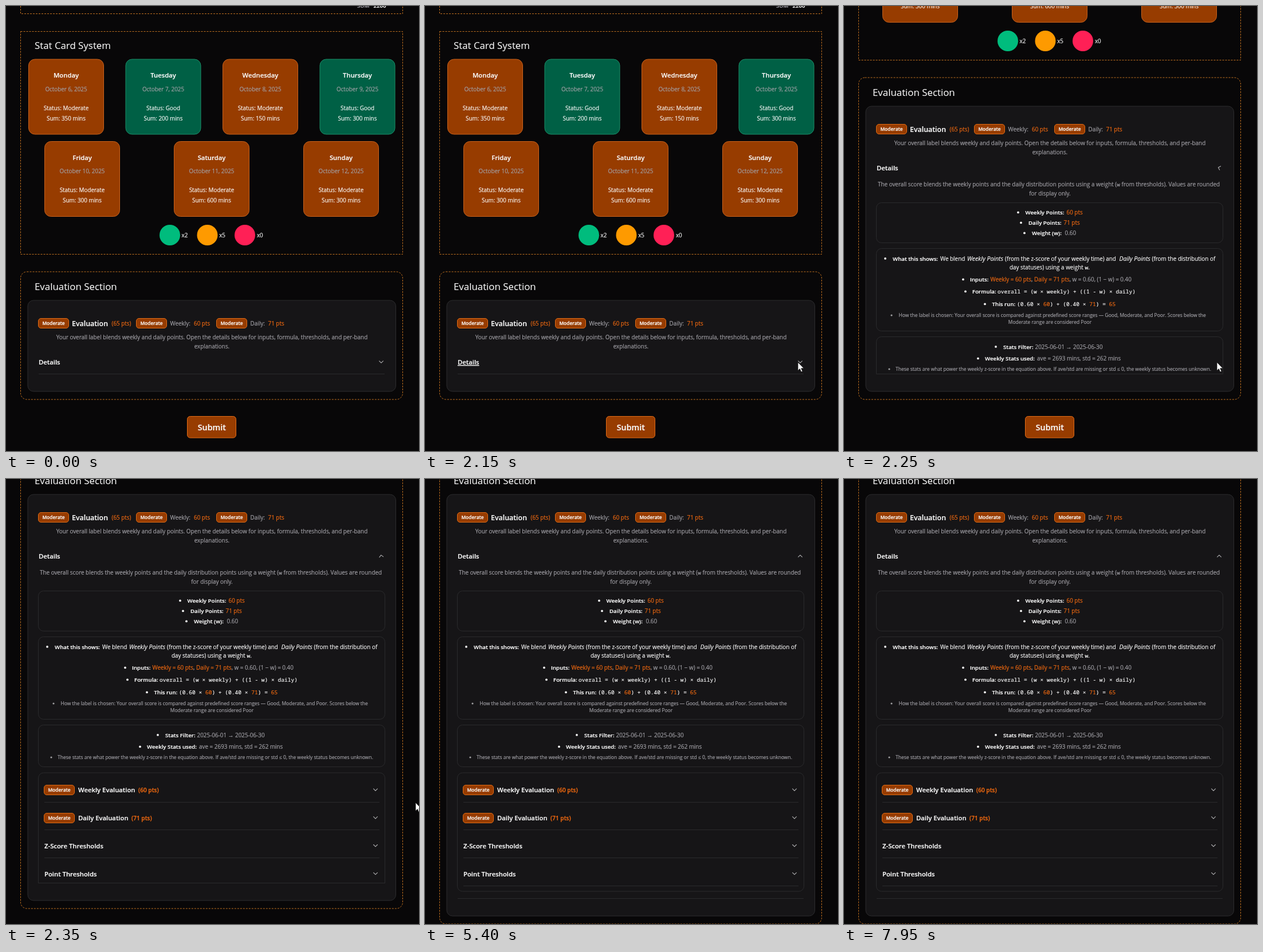
Animation of 721x777 px, one loop 8000 ms. Source, as an HTML page:

```html
<!DOCTYPE html>
<html lang="en">
<head>
<meta charset="utf-8">
<title>Stat cards and evaluation</title>
<style>
  html, body { margin: 0; width: 100%; height: 100%; overflow: hidden; background: #080708; }
  svg { display: block; width: 721px; height: 777px; }
  text {
    font-family: "Open Sans", "Noto Sans", sans-serif; font-size: 9.9px; white-space: pre;
    color: #a3a2a8; fill: currentColor; stroke: currentColor; stroke-width: .16px;
  }
  tspan { fill: currentColor; stroke: currentColor; }
  .mid { text-anchor: middle; }
  .b { font-weight: 600; stroke-width: .22px; }
  tspan.b { font-size: 9.7px; }
  .w { color: #fafafa; }
  .o { color: #f36a10; }
  .i { font-style: italic; font-size: 10.5px; }
  .m { font-family: "Noto Sans Mono", "DejaVu Sans Mono", monospace; font-size: 9.57px; font-weight: 500; }
  .h1 { font-size: 16.85px; stroke-width: .1px; }
  .h2 { font-size: 12.4px; }
  .h3 { font-size: 11.3px; }
  .pts { font-size: 10.1px; }
  .tag { font-size: 8.35px; }
  .btn { font-size: 14.3px; }
  .sm { font-size: 8.49px; }
  .dash { fill: none; stroke: #c0701f; stroke-dasharray: 3 2; }
  .line, .box { fill: none; stroke: #2a2a2c; }
  .panel { fill: #161517; stroke: #2c2c2e; }
  .warn { fill: #973c00; stroke: #c9621c; }
  .badge { fill: #973c00; stroke: #e06c18; }
  .good { fill: #006045; stroke: #1c8e68; }
  .chev { fill: none; stroke: #b0b0b2; stroke-width: 1.1; stroke-linecap: round; stroke-linejoin: round; }
</style>
</head>
<body>
<svg id="stage" viewBox="0 0 721 777">
  <defs><clipPath id="reveal"><rect id="window" x="26" y="643" width="666" height="0"/></clipPath></defs>
  <rect width="721" height="777" fill="#080708"/>
  <g id="page"></g>
  <path id="cursor" d="M0 0V14.6L3.4 11.5L5.7 16.9L8.1 15.9L5.8 10.7H10.4Z" fill="#fff" stroke="#111" stroke-width=".8"/>
</svg>
<script>
const LOOP = 8000, STEP = 50;
const OPEN_AT = 2166, OPEN_FOR = 235;
const GROWTH = 577, MAX_SCROLL = 487;
const $ = id => document.getElementById(id);

function add(parent, tag, attrs, content) {
  const el = document.createElementNS("http://www.w3.org/2000/svg", tag);
  for (const k in attrs) el.setAttribute(k, attrs[k]);
  if (content !== undefined) el.textContent = content;
  parent.appendChild(el);
  return el;
}
const group = (p, attrs = {}) => add(p, "g", attrs);
const box = (p, cls, x, y, width, height, rx = 0) =>
  add(p, "rect", { class: cls, x, y, width, height, rx });
const text = (p, cls, x, y, s) => add(p, "text", { class: cls, x, y }, s);
const line = (p, x1, x2, y) => add(p, "path", { class: "line", d: `M${x1} ${y}H${x2}` });
const dot = (p, cx, cy, r, fill) => add(p, "circle", { cx, cy, r, fill });
const chevron = (p, x, y) =>
  add(p, "path", { class: "chev", d: "M-3.4-1.7L0 1.7L3.4-1.7", transform: `translate(${x} ${y})` });

// Each part is [class, string] or [class, string, x].
function rich(p, x, y, parts) {
  const el = add(p, "text", { x, y });
  for (const [cls, s, px] of parts)
    add(el, "tspan", px ? { class: cls, x: px } : { class: cls }, s);
}
function bullet(p, bx, x, y, parts, small) {
  dot(p, bx, y - (small ? 3 : 3.6), small ? 1.6 : 1.9, small ? "#a0a0a2" : "#f6f6f6");
  rich(p, x, y, parts);
}
function badge(p, x, y) {
  box(p, "badge", x - .5, y - 8.5, 53, 17, 4.5);
  text(p, "tag b w mid", x + 26, y + 3, "Moderate");
}

function card(p, x, y, day, date, status, sum) {
  box(p, status === "Good" ? "good" : "warn", x, y, 131, 131, 11);
  const c = x + 65.5;
  text(p, "h3 b w mid", c, y + 32, day);
  text(p, "mid", c, y + 55.5, `October ${date}, 2025`);
  text(p, "w mid", c, y + 88.5, `Status: ${status}`);
  text(p, "w mid", c, y + 106.5, `Sum: ${sum} mins`);
}

const page = $("page");

function drawStats() {
  add(page, "path", { class: "dash", d: "M25.5-20V13.5H692.5V-20" });
  rich(page, 613, 3, [["b", "SUM"], ["b w", "2200", 641.5]]);
  box(page, "dash", 25.5, 44.5, 667, 389);
  text(page, "h1 w", 50, 75, "Stat Card System");
  const week = [["Monday", 350], ["Tuesday", 200], ["Wednesday", 150], ["Thursday", 300],
    ["Friday", 300], ["Saturday", 600], ["Sunday", 300]];
  week.forEach(([day, sum], i) => {
    const status = i === 1 || i === 3 ? "Good" : "Moderate";
    const x = i < 4 ? 39.5 + 169.5 * i : 67.5 + 226 * (i - 4);
    card(page, x, i < 4 ? 93 : 236.5, day, 6 + i, status, sum);
  });
  [["#00bc7d", 2], ["#fe9a00", 5], ["#ff2056", 0]].forEach(([color, n], i) => {
    dot(page, 286 + 65.5 * i, 400, 18, color);
    text(page, "w", 306.5 + 65.7 * i, 404.3, "x" + n);
  });
}
drawStats();

const frame = box(page, "dash", 25.5, 464, 667, 223, 11);
const panel = box(page, "panel", 38, 514, 642.5, 159, 10);
let details, arrow;

function drawSummary() {
  text(page, "h1 w", 50, 496, "Evaluation Section");
  badge(page, 57, 554);
  text(page, "h2 b w", 115, 558.6, "Evaluation");
  text(page, "o", 184.5, 557.8, "(65 pts)");
  badge(page, 228, 554);
  text(page, "", 286.5, 557.8, "Weekly:");
  text(page, "o", 328, 557.8, "60 pts");
  badge(page, 368, 554);
  text(page, "", 426.5, 557.8, "Daily:");
  text(page, "o", 457.5, 557.8, "71 pts");
  text(page, "mid", 359.5, 582, "Your overall label blends weekly and daily points. Open the details below for inputs, formula, thresholds, and per-band");
  text(page, "mid", 359.5, 597.5, "explanations.");
  details = text(page, "h3 b w", 57, 626, "Details");
  arrow = chevron(page, 655, 621.5);
}
drawSummary();

function drawDetails() {
  const g = group(group(page, { "clip-path": "url(#reveal)" }), { transform: "translate(0 487)" });
  rich(g, 59, 167, [["", "The overall score blends the weekly points and the daily distribution points using a weight ("],
    ["m", "w"], ["", " from thresholds). Values are rounded"]]);
  text(g, "mid", 359.5, 183, "for display only.");

  box(g, "box", 56.5, 195.5, 605, 70, 9);
  bullet(g, 304, 316.5, 216, [["b w", "Weekly Points: "], ["o", "60 pts", 388.5]]);
  bullet(g, 309, 322, 234, [["b w", "Daily Points: "], ["o", "71 pts", 383.5]]);
  bullet(g, 315, 328, 252, [["b w", "Weight (w): "], ["", "0.60", 385.5]]);

  box(g, "box", 56.5, 275.5, 605, 144, 9);
  bullet(g, 72, 85, 296.5, [["b w", "What this shows:"], ["w", "We blend", 168], ["w i", "Weekly Points", 215],
    ["w", "(from the z-score of your weekly time) and", 281], ["w i", "Daily Points", 480.5],
    ["w", "(from the distribution of", 537.5]]);
  rich(g, 289, 312, [["w", "day statuses) using a weight "], ["w b m", "w"], ["w", "."]]);
  bullet(g, 208, 220, 333, [["b w", "Inputs:"], ["o", "Weekly = 60 pts", 255.5], ["", ", "],
    ["o", "Daily = 71 pts"], ["", ", w = 0.60, (1 − w) = 0.40"]]);
  bullet(g, 212, 224, 354, [["b w", "Formula:"], ["w m", "overall = (w × weekly) + ((1 - w) × daily)", 268]]);
  bullet(g, 246, 258.5, 376, [["b w", "This run:"], ["w m", "(0.60 × ", 302], ["o m", "60"],
    ["w m", ") + (0.40 × "], ["o m", "71"], ["w m", ") = "], ["o m", "65"]]);
  bullet(g, 83, 95.5, 395, [["sm", "How the label is chosen: Your overall score is compared against predefined score ranges — Good, Moderate, and Poor. Scores below the"]], true);
  text(g, "sm mid", 359.5, 406.7, "Moderate range are considered Poor");

  box(g, "box", 56.5, 429.5, 605, 73, 9);
  bullet(g, 265, 278, 450.5, [["b w", "Stats Filter:"], ["", "2025-06-01 → 2025-06-30", 333.5]]);
  bullet(g, 234, 246, 471, [["b w", "Weekly Stats used:"], ["", "ave = 2693 mins, std = 262 mins", 337]]);
  bullet(g, 79, 90, 489, [["sm", "These stats are what power the weekly z-score in the equation above. If ave/std are missing or std ≤ 0, the weekly status becomes unknown."]], true);

  box(g, "box", 56.5, 513, 605, 207, 9);
  ["Weekly Evaluation", "Daily Evaluation", "Z-Score Thresholds", "Point Thresholds"].forEach((name, i) => {
    const y = 543 + 48.8 * i, tagged = i < 2;
    if (tagged) {
      badge(g, 67, Math.round(y));
      text(g, "o b pts", i ? 219 : 231, y + 4, i ? "(71 pts)" : "(60 pts)");
    }
    text(g, "h3 b w", tagged ? 126 : 67, y + 4.2, name);
    chevron(g, 645, y - .4);
    line(g, 67, 652, Math.round(y + 20.5) + .5);
  });
}
drawDetails();

const rule = line(page, 57, 661, 642.5);
const submit = group(page);
box(submit, "badge", 316.5, 716.5, 85, 37.5, 5);
text(submit, "btn b w mid", 359.3, 741, "Submit");

// Pointer path as [time, x, y], straight between points.
const route = [[1600, 722, 575], [1950, 651, 622], [2250, 651, 622], [2350, 715, 565], [2400, 747, 537]];
function pointer(t) {
  for (let i = 1; i < route.length; i++) {
    const [t0, x0, y0] = route[i - 1], [t1, x1, y1] = route[i];
    if (t >= t0 && t <= t1) {
      const k = (t - t0) / (t1 - t0);
      return [x0 + (x1 - x0) * k, y0 + (y1 - y0) * k];
    }
  }
  return [800, 0];
}

function render(t) {
  const x = Math.min(1, Math.max(0, (t - OPEN_AT) / OPEN_FOR));
  const p = 1 - (1 - x) ** 2;
  const grow = Math.round(GROWTH * p);
  const scroll = Math.min(grow, MAX_SCROLL);
  page.setAttribute("transform", `translate(0 ${-scroll})`);
  frame.setAttribute("height", 223 + grow);
  panel.setAttribute("height", 159 + grow);
  $("window").setAttribute("height", grow);
  rule.setAttribute("transform", `translate(0 ${grow})`);
  submit.setAttribute("transform", `translate(0 ${grow})`);
  arrow.setAttribute("transform", `translate(655 621.5) rotate(${180 * p})`);
  const [cx, cy] = pointer(t);
  $("cursor").setAttribute("transform", `translate(${cx} ${cy})`);
  const hover = cx < 662 && cy > 602 && grow === 0;
  details.setAttribute("text-decoration", hover ? "underline" : "none");
}

const start = performance.now();
function tick() {
  const t = (performance.now() - start) % LOOP;
  render(Math.floor(t / STEP) * STEP);
  requestAnimationFrame(tick);
}
render(0);
requestAnimationFrame(tick);
</script>
</body>
</html>
```
